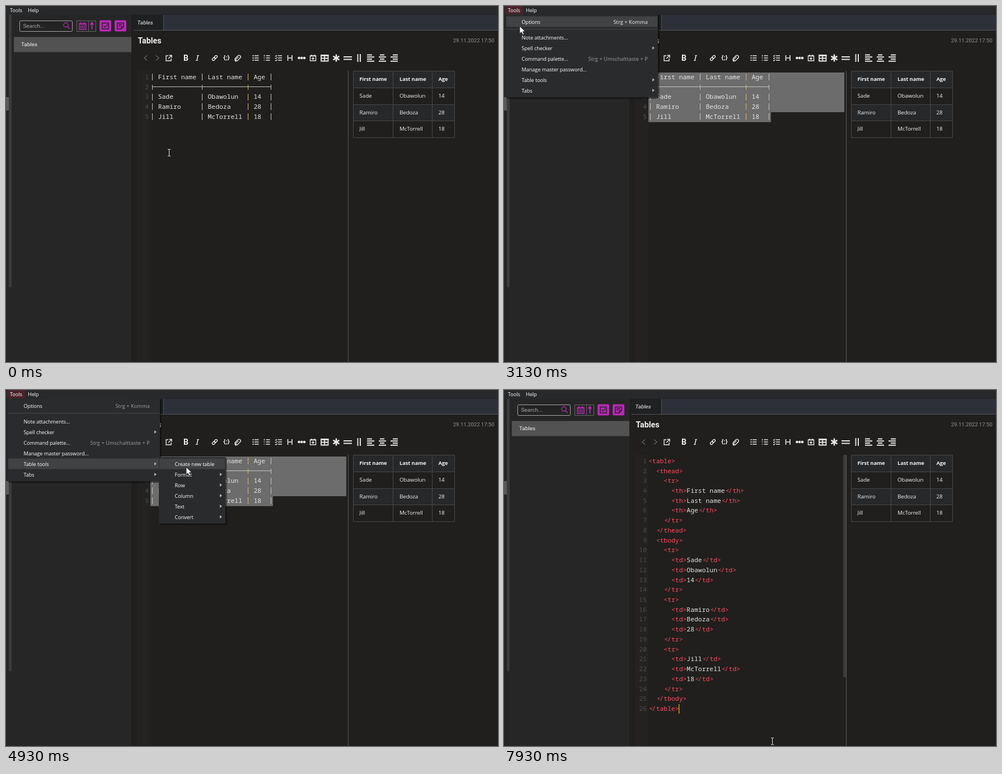
An HTML page for the animation above (8000 ms loop, 879 px wide and 637 px high).

```html
<!DOCTYPE html>
<html lang="en">
<head>
<meta charset="utf-8">
<title>Table tools</title>
<style>
  html, body { margin: 0; width: 100%; height: 100%; overflow: hidden; background: #201f1d; }
  svg { display: block; width: 100vw; height: 100vh; }
  text { white-space: pre; fill: #f2f2f2; }
  .ui { font: 9.9px Roboto, sans-serif; }
  .menu { font: 9.2px "Open Sans", sans-serif; letter-spacing: -.08px; }
  .menu text { fill: #fff; }
  .menu .key { fill: #a0a1a3; letter-spacing: .1px; }
  .menu .on .key { fill: #f2f2f2; }
  .menu .on rect { fill: #414244; }
  .cell { font: 9.8px "Open Sans", sans-serif; letter-spacing: -.1px; }
  .head { font-weight: 700; font-size: 9.4px; }
  .code text { font: 500 11.4px "Noto Sans Mono", monospace; fill: #e4e4e2; }
  .code .num { fill: #4e4d4b; font-weight: 400; text-anchor: end; }
  .code .tag { fill: #ff4a62; }
  .icons { fill: none; stroke: #e8e8e8; stroke-width: 1.4; }
  .icons text { stroke: none; }
  .solid { fill: #e8e8e8; stroke: none; }
</style>
</head>
<body>
<svg viewBox="0 0 879 637" preserveAspectRatio="none">
  <rect width="879" height="637" fill="#201f1d"/>
  <rect width="224" height="637" fill="#262626"/>
  <rect x="234" y="116" width="24" height="521" fill="#232220"/>

  <!-- sidebar -->
  <rect y="15" width="5" height="622" fill="#252525"/>
  <rect x="5" y="15" width="5" height="488" fill="#3b3b3b"/>
  <rect y="163" width="5" height="24" fill="#595959"/>
  <rect x="14" y="55.5" width="210" height="27" fill="#525252"/>
  <text class="ui" x="27" y="72.3">Tables</text>
  <rect x="24.5" y="26.5" width="94" height="19" rx="2" fill="#232323" stroke="#a6a6a6"/>
  <text class="ui" x="30.5" y="39" style="fill:#a8a8a8">Search...</text>
  <g fill="none" stroke="#b728b5" stroke-width="1.4">
    <circle cx="107" cy="34" r="4"/><path d="M110 37l4 4"/>
    <path d="M131 31.5h12v10.5h-12zM131 32.5h12M134 28.5v3M140 28.5v3"/>
    <path d="M133 36h8M133 39h8" stroke-width="2" stroke-dasharray="2 1"/>
    <path d="M153.5 42V31M150.5 33.5l3-4 3 4" stroke-width="2"/>
  </g>
  <path d="M126.5 26.5h34v19h-34zM147.5 26.5v19" fill="none" stroke="#666"/>
  <rect x="167" y="25.5" width="21" height="20" rx="2" fill="#b728b5"/>
  <rect x="194" y="25.5" width="21" height="20" rx="2" fill="#b728b5"/>
  <g fill="none" stroke="#262026" stroke-width="1.4">
    <path d="M172 30.5h11v10.5h-11zM174.5 35.5l2.5 2.5 4.5-5"/>
    <path d="M199 30.5h11v6.5l-4 4h-7zM210 37h-4v4M201.5 33.5h6M201.5 36h3"/>
  </g>

  <!-- title bar and tabs -->
  <rect width="879" height="15.5" fill="#27292b"/>
  <rect id="tools" x="2" width="32" height="15" fill="#49242a"/>
  <g class="menu"><text x="7" y="11">Tools</text><text x="39" y="11">Help</text></g>
  <rect x="228" y="16" width="651" height="27" fill="#2e3039"/>
  <rect x="228" y="16" width="53" height="27" fill="#1e2022"/>
  <path d="M281.5 16v27M228 43.5h651" stroke="#50535a" fill="none"/>
  <text class="ui" x="234.5" y="33.3" style="font-style:italic">Tables</text>
  <text x="235.5" y="67.3" style="font:700 14.2px Roboto, sans-serif">Tables</text>
  <text class="ui" x="872.5" y="65" text-anchor="end" style="font-size:9.5px;fill:#949494">29.11.2022 17:50</text>

  <!-- toolbar -->
  <g class="icons">
    <path d="M252 88.5l-5 4.5 5 4.5M268 88.5l5 4.5-5 4.5" stroke="#66645f"/>
    <path d="M290 89h-4v9h9v-4M291.5 88.3h4.5v4.5M296 88.3l-6 6"/>
    <text x="317" y="98" style="font:700 14px Roboto, sans-serif">B</text>
    <text x="339" y="98" style="font:italic 15px 'Noto Serif', serif">I</text>
    <g transform="rotate(-45 373 93)"><rect x="367.5" y="91" width="6" height="4" rx="2"/><rect x="372.5" y="91" width="6" height="4" rx="2"/></g>
    <text x="394" y="96.3" text-anchor="middle" style="font:700 10.5px 'Open Sans', sans-serif">{;}</text>
    <g transform="rotate(45 414 93)"><path d="M411.5 96v-6a2.8 2.8 0 0 1 5.6 0v6.5a1.8 1.8 0 0 1-3.6 0v-6M411.5 95v1.5a3.6 3.6 0 0 0 5 3"/></g>
    <path d="M444 89h7.5M444 93h7.5M444 97h7.5M464.5 89h7M464.5 93h7M464.5 97h7M486 89h7M486 93h7M486 97h7" stroke-width="1.7"/>
    <path d="M440.5 89h2M440.5 93h2M440.5 97h2" stroke-width="2"/>
    <path d="M461.5 87.5v3M460.5 93h2M460.5 97h2" stroke-width="1.2"/>
    <path d="M481 89l1.3 1.3 2.2-2.7M481 93l1.3 1.3 2.2-2.7M481 97l1.3 1.3 2.2-2.7" stroke-width="1.1"/>
    <path d="M503.5 88v10M511 88v10M503.5 93h7.5" stroke-width="1.6"/>
    <path d="M543.5 89h10v9h-10zM543.5 89.5h10M546 87v2M551 87v2M548.5 91.5v5M546 94h5"/>
    <path d="M590 86.5v13M584.5 89.8l11 6.5M584.5 96.3l11-6.5" stroke-width="2.6"/>
    <path d="M603 91h15M603 95.5h15M628.5 86v14M633 86v14" stroke-width="1.9"/>
    <path d="M645 87.5h9M645 91.2h13M645 95h9M645 98.7h13M668 87.5h8M666 91.2h13M668 95h8M666 98.7h13M691 87.5h9M687 91.2h13M691 95h9M687 98.7h13" stroke-width="1.9"/>
    <g class="solid"><circle cx="523.5" cy="93" r="2.3"/><circle cx="528.2" cy="93" r="2.3"/><circle cx="533" cy="93" r="2.3"/></g>
    <path d="M563 88h12.5v10.5H563zM563 93.5h12.5M569.2 90v8.5" stroke-width="1.8"/><path d="M562 88.5h14.4" stroke-width="3"/>
  </g>

  <!-- editor and preview -->
  <path id="selection" fill="#6c6c6c"/>
  <g id="markdown" class="code"></g>
  <g id="html" class="code">
    <rect x="606" y="116" width="5" height="398" fill="#3b3a39"/>
  </g>
  <rect id="caret" x="312" y="562" width="1.3" height="17" fill="#f5aa0a"/>
  <path d="M611.5 116v521" stroke="#5a5957"/>
  <g id="preview">
    <path d="M620 116h182v30H620zM620 176h182v30H620z" fill="#27282a"/>
    <path d="M620.5 116.5h181v119h-181zM691.5 116v120M761.5 116v120M620 146.5h182M620 176.5h182M620 205.5h182" fill="none" stroke="#484847"/>
  </g>

  <g id="menus" class="menu"></g>
  <path id="arrow" d="M0 0v13.5l3.2-3 2.2 5 2.4-1-2.2-4.8h4.4z" fill="#fff" stroke="#111" stroke-width=".8"/>
  <path id="beam" d="M-2.5-6h2l.5.6.5-.6h2M-2.5 6h2l.5-.6.5.6h2M0-5.5v11" fill="none" stroke="#e6e6e6"/>
</svg>
<script>
const LOOP = 8000, STEP = 1000 / 15;
const LEFT = 258, CHAR = 6.84, TOP = 119, LINE = 17.73;
const NS = "http://www.w3.org/2000/svg";
const $ = id => document.getElementById(id);
const esc = s => s.replace(/</g, "&lt;").replace(/>/g, "&gt;");

function add(parent, name, attrs, markup = "") {
  const el = document.createElementNS(NS, name);
  for (const key in attrs) el.setAttribute(key, attrs[key]);
  el.innerHTML = markup;
  parent.appendChild(el);
  return el;
}

const header = ["First name", "Last name", "Age"];
const people = [["Sade", "Obawolun", "14"], ["Ramiro", "Bedoza", "28"], ["Jill", "McTorrell", "18"]];

function codeLine(parent, i, markup) {
  const y = TOP + 11.8 + i * LINE;
  add(parent, "text", { class: "num", x: 255, y }, i + 1);
  add(parent, "text", { x: LEFT, y }, markup);
}

// Markdown table: cells as text, pipes and the rule as lines
const bars = [0, 13, 25, 31];
const barX = c => Math.floor(LEFT + (c + .5) * CHAR);
[header, null, ...people].forEach((row, i) => {
  const mid = TOP + 8.2 + i * LINE;
  codeLine($("markdown"), i, row ? `  ${row[0].padEnd(13)}${row[1].padEnd(12)}${row[2]}` : "");
  bars.forEach((c, k) => add($("markdown"), "rect", {
    x: barX(c), y: Math.round(mid - (row ? 6 : 4)), width: 1, height: row ? 12 : 9,
    fill: k === 2 ? "#dcb968" : "#c4c4c2"
  }));
  if (!row) add($("markdown"), "rect", { x: barX(0), y: 144, width: barX(31) - barX(0), height: 1, fill: "#c4c4c2" });
});

// The same table as HTML; "</" is drawn tight, like a ligature
const rowLines = (cells, tag) =>
  ["    <tr>", ...cells.map(c => `      <${tag}>${c}</${tag}>`), "    </tr>"];
const html = ["<table>", "  <thead>", ...rowLines(header, "th"), "  </thead>", "  <tbody>",
  ...people.flatMap(p => rowLines(p, "td")), "  </tbody>", "</table>"];
const paintTag = tag => tag[1] === "/"
  ? `<tspan class="tag"><tspan dx="1.2">&lt;</tspan><tspan dx="-1.7">/</tspan><tspan dx=".5">${esc(tag.slice(2))}</tspan></tspan>`
  : `<tspan class="tag">${esc(tag)}</tspan>`;
html.forEach((line, i) => codeLine($("html"), i, line.replace(/<[^>]+>/g, paintTag)));

// Preview cells
[header, ...people].forEach((row, r) => row.forEach((cell, c) =>
  add($("preview"), "text", { class: r ? "cell" : "cell head", x: [631.5, 703, 772.5][c], y: 134 + r * 29.8 }, cell)));

// Menus: items are [label, centre y, shortcut or ">"]
const list = (y, items) => items.map(([label, mark], i) => [label, y + 19 * i, mark]);
const menus = [
  { x: 3, y: 15.5, w: 272, h: 148, from: 2700, items: [["Options", 28.5, "Strg + Komma"], ...list(56.5, [
    ["Note attachments..."], ["Spell checker", ">"], ["Command palette...", "Strg + Umschalttaste + P"],
    ["Manage master password..."], ["Table tools", ">"], ["Tabs", ">"]])] },
  { x: 273, y: 120, w: 119, h: 119, from: 4040, parent: 5, items: list(132.5, [
    ["Create new table"], ["Format", ">"], ["Row", ">"], ["Column", ">"], ["Text", ">"], ["Convert", ">"]]) },
  { x: 389, y: 215.5, w: 201, h: 61, from: 5840, parent: 5, items: list(227.5, [
    ["CSV to Markdown table"], ["Markdown table to HTML"], ["Markdown table to CSV"]]) }
];
const MENU_END = 6700;
menus.forEach((m, n) => {
  m.el = add($("menus"), "g", {});
  add(m.el, "rect", { x: m.x + 1.5, y: m.y + 1.5, width: m.w + 1, height: m.h + 1, fill: "#000", opacity: .45 });
  add(m.el, "rect", { x: m.x, y: m.y, width: m.w, height: m.h, fill: "#292b2d" });
  if (!n) add(m.el, "rect", { x: m.x, y: 41, width: m.w, height: 1, fill: "#46484a" });
  m.rows = m.items.map(([label, y, mark]) => {
    const row = add(m.el, "g", {});
    add(row, "rect", { x: m.x + 1, y: y - 10, width: m.w - 2, height: 19, fill: "none" });
    add(row, "text", { x: m.x + 28.5, y: y + 3 }, label);
    if (mark === ">") add(row, "path", { d: `M${m.x + m.w - 10} ${y - 3.5}l4 3-4 3z`, fill: "#aeb0b2" });
    else if (mark) add(row, "text", { class: "key", x: 257, y: y + 3, "text-anchor": "end" }, mark);
    return row;
  });
});

// Pointer path: [time, x, y]
const path = [
  [0, 291, 262], [360, 6, 111], [870, 572, 252], [900, 572, 252], [1600, 214, 122], [1870, 214, 122],
  [1933, 210, 122], [2600, 27, 9], [3010, 27, 9], [3133, 28, 36], [3800, 55, 128], [4080, 55, 128],
  [4800, 321, 137], [4870, 321, 137], [4933, 322, 138], [5010, 322, 138], [5400, 329, 215],
  [5600, 332, 229], [5810, 332, 229], [6333, 485, 241], [7270, 485, 241], [7600, 518, 420], [7933, 479, 628]
];
function pointer(t) {
  const i = path.findIndex(p => p[0] > t);
  if (i < 0) return path[path.length - 1].slice(1);
  const [t0, x0, y0] = path[i - 1], [t1, x1, y1] = path[i];
  const k = (t - t0) / (t1 - t0), e = k * k * (3 - 2 * k);
  return [x0 + (x1 - x0) * e, y0 + (y1 - y0) * e];
}

function selectionPath(x, y) {
  const first = Math.max(0, Math.floor((y - TOP) / LINE));
  const col = Math.min(32, Math.max(0, Math.round((x - LEFT) / CHAR)));
  let d = "";
  for (let i = first; i < 5; i++) {
    const a = i === first ? LEFT + col * CHAR : LEFT, b = i < 4 ? 608 : LEFT + 32 * CHAR;
    d += `M${a} ${TOP + i * LINE}H${b}v${LINE}H${a}z`;
  }
  return d;
}

const clamp = v => Math.min(1, Math.max(0, v));
const show = (el, on) => el.setAttribute("visibility", on ? "visible" : "hidden");

function render(now) {
  const t = Math.floor((now % LOOP + 4) / STEP) * STEP;
  const [x, y] = pointer(t);
  const converted = t > 6840, menuOpen = t >= menus[0].from && t < MENU_END;

  show($("markdown"), !converted);
  show($("html"), converted);
  show($("caret"), converted && !(t > 7390 && t < 7920));
  $("selection").setAttribute("d", t < 900 || converted ? "" : selectionPath(...(t < 1600 ? [x, y] : [0, 0])));
  $("tools").setAttribute("opacity", clamp((t - 2735) / 195) * clamp((7000 - t) / 260));

  const open = menus.map(m => menuOpen && t >= m.from);
  const top = open.lastIndexOf(true);
  const over = menus.findIndex((m, n) => open[n] && x >= m.x && x < m.x + m.w && y >= m.y && y < m.y + m.h
    && !(open[n + 1] && x >= menus[n + 1].x && y >= menus[n + 1].y));
  menus.forEach((m, n) => {
    show(m.el, open[n]);
    m.rows.forEach((row, i) => {
      const hit = over === n && Math.abs(y - m.items[i][1]) <= 9.5;
      row.setAttribute("class", n < top ? (i === menus[n + 1].parent ? "on" : "") : hit ? "on" : "");
    });
  });

  const beam = !menuOpen && x > 234 && x < 611 && y > 115;
  show($("beam"), beam);
  show($("arrow"), !beam);
  const place = `translate(${Math.round(x) + (beam ? .5 : 0)} ${Math.round(y) + (beam ? .5 : 0)})`;
  $("beam").setAttribute("transform", place);
  $("arrow").setAttribute("transform", place);
}

const start = performance.now();
function tick() {
  render(performance.now() - start);
  requestAnimationFrame(tick);
}
tick();
</script>
</body>
</html>
```
